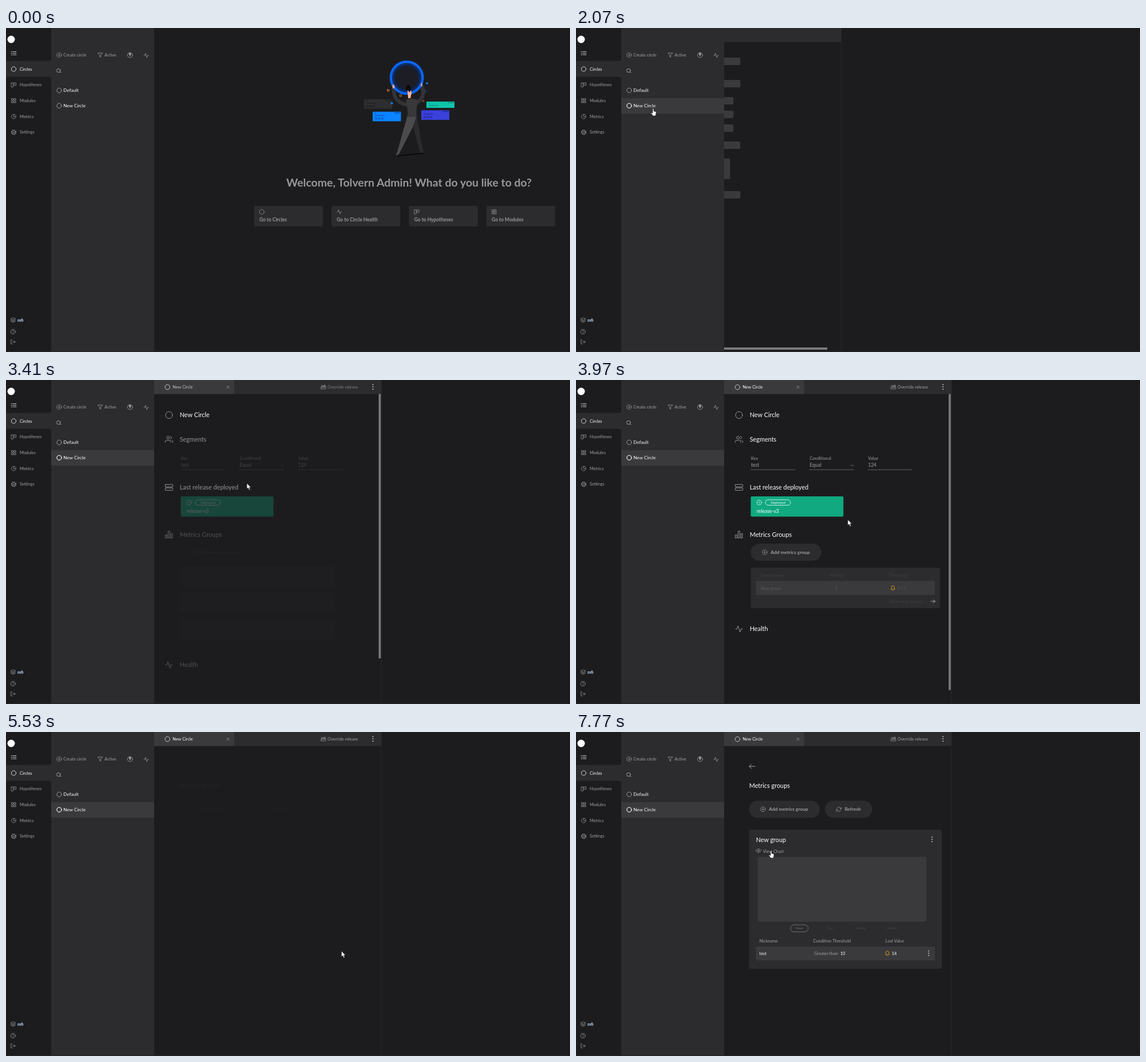
Animation, 986 px wide and 568 px high, one loop 8 s. Source, as an HTML page:

```html
<!DOCTYPE html>
<html lang="en">
<head>
<meta charset="utf-8">
<title>Circles workspace</title>
<style>
html, body { margin: 0; width: 100%; height: 100%; overflow: hidden; background: #1c1c1e; }
svg { display: block; width: 100%; height: 100%; font-family: Lato, sans-serif; }
text { white-space: pre; }
</style>
</head>
<body>
<svg id="stage" viewBox="0 0 986 568" xmlns="http://www.w3.org/2000/svg"></svg>
<script>
const LOOP = 8000;
const GREY = '#a0a0a3', DIM = '#98989b', WHITE = '#fff', PANEL = '#2c2c2e', RAISED = '#3a3a3c';

// Icons live in a 24 unit box
const ICONS = {
  circle: '<circle cx="12" cy="12" r="10"/>',
  list: '<path d="M9 5h14M9 12h14M9 19h14M1 5h4M1 12h4M1 19h4"/>',
  board: '<path d="M2 3h8v18H2zM14 3h8v11h-8z"/>',
  grid: '<path d="M3 3h7v7H3zM14 3h7v7h-7zM14 14h7v7h-7zM3 14h7v7H3z"/>',
  pie: '<path d="M21.2 15.9A10 10 0 1 1 8 2.8M22 12A10 10 0 0 0 12 2v10z"/>',
  gear: '<circle cx="12" cy="12" r="3.2"/><circle cx="12" cy="12" r="8.5"/><circle cx="12" cy="12" r="10.3" stroke-dasharray="4 4.1"/>',
  layers: '<path d="M12 2L2 7l10 5 10-5zM2 17l10 5 10-5M2 12l10 5 10-5"/>',
  help: '<circle cx="12" cy="12" r="10"/><path d="M9 9a3 3 0 0 1 6 1c0 2-3 2-3 4M12 17v.5"/>',
  exit: '<path d="M9 21H3V3h6M16 17l5-5-5-5M21 12H9"/>',
  plus: '<circle cx="12" cy="12" r="10"/><path d="M12 8v8M8 12h8"/>',
  filter: '<path d="M22 3H2l8 9.5V19l4 2v-8.5z"/>',
  pin: '<circle cx="12" cy="12" r="10"/><path d="M9 4h6v6l-3 4-3-4zM12 10v6" fill="#a0a0a3"/>',
  pulse: '<path d="M22 12h-4l-3 9L9 3l-3 9H2"/>',
  search: '<circle cx="11" cy="11" r="8"/><path d="M21 21l-4.3-4.3"/>',
  users: '<circle cx="9" cy="7" r="4"/><path d="M1 21v-2a4 4 0 0 1 4-4h8a4 4 0 0 1 4 4v2M23 21v-2a4 4 0 0 0-3-3.9M16 3.1a4 4 0 0 1 0 7.8"/>',
  server: '<rect x="1" y="4" width="22" height="7" rx="1.5"/><rect x="1" y="14" width="22" height="7" rx="1.5"/>',
  bars: '<path d="M2 13h4v9H2zM10 2h4v20h-4zM18 9h4v13h-4z"/>',
  info: '<circle cx="12" cy="12" r="10"/><path d="M12 16v-5M12 8v-.5"/>',
  bell: '<path d="M18 8A6 6 0 0 0 6 8c0 7-3 9-3 9h18s-3-2-3-9M13.7 21a2 2 0 0 1-3.4 0"/>',
  right: '<path d="M2 12h20M14 5l8 7-8 7"/>',
  left: '<path d="M22 12H2M10 5l-8 7 8 7"/>',
  down: '<path d="M5 8l7 7 7-7"/>',
  close: '<path d="M5 5l14 14M19 5L5 19"/>',
  swap: '<path d="M3 9V5h17M17 2l4 3-4 3M1 13v7h21v-7zM7 13v-3h13"/>',
  refresh: '<path d="M23 4v6h-6M1 20v-6h6M3.5 9a9 9 0 0 1 14.9-3.4L23 10M1 14l4.6 4.4A9 9 0 0 0 20.5 15"/>',
  eye: '<path d="M1 12s4-8 11-8 11 8 11 8-4 8-11 8-11-8-11-8z"/><circle cx="12" cy="12" r="3"/>',
  eyeOff: '<path d="M1 12s4-8 11-8 11 8 11 8-4 8-11 8-11-8-11-8zM21 1L3 23M9 12a3 3 0 0 1 5-2"/>'
};

const icon = (name, x, y, size = 9.7, color = GREY, weight = 1.9) =>
  `<g transform="translate(${x - size / 2} ${y - size / 2}) scale(${size / 24})" fill="none" stroke="${color}" stroke-width="${weight}" stroke-linecap="round" stroke-linejoin="round">${ICONS[name]}</g>`;
const text = (x, y, s, size = 7.4, color = GREY, attrs = '') =>
  `<text x="${x}" y="${y + size * .35}" font-size="${size}" fill="${color}" ${attrs}>${s}</text>`;
const bold = ' font-weight="700"', mid = ' text-anchor="middle"';
const rect = (x, y, w, h, fill, r = 0, attrs = '') =>
  `<rect x="${x}" y="${y}" width="${w}" height="${h}" rx="${r}" fill="${fill}" ${attrs}/>`;
const dots = (x, y, color = '#c8c8ca') =>
  [-4, 0, 4].map(d => `<circle cx="${x}" cy="${y + d}" r="1.05" fill="${color}"/>`).join('');
const shape = (d, fill, attrs = '') => `<path d="${d}" fill="${fill}" ${attrs}/>`;
const fade = (start, length, s) => `<g data-fade="${start},${length}">${s}</g>`;
const during = (from, to, s) => `<g data-span="${from},${to}">${s}</g>`;
const shift = (x, y, s) => `<g transform="translate(${x} ${y})">${s}</g>`;

function miniCard(x, y, w, h, fill, ink) {
  let s = rect(x, y, w, h, fill, .8) + rect(x + 4, y + 6, 17, 1.4, ink) + rect(x + w - 12, y + 1, 11, 1.8, ink) +
    `<circle cx="${x + 5}" cy="${y + 3}" r="1.1" fill="${ink}"/>`;
  if (h > 12) for (let i = 0; i < 3; i++)
    s += `<circle cx="${x + 6 + i * 5.6}" cy="${y + 12}" r="1.8" fill="${ink}" fill-opacity=".5" stroke="${ink}" stroke-width=".7"/>`;
  return s;
}

const ring = (r, color, w) => `<circle cx="700.6" cy="87" r="${r}" fill="none" stroke="${color}" stroke-width="${w}"/>`;
const artwork =
  miniCard(626, 125, 49, 16.5, '#2e2e30', '#1f1f21') + miniCard(641, 146.7, 49.5, 16.8, '#0a84ff', '#0a58bd') +
  miniCard(735, 129, 49, 11, '#0fc4aa', '#0a9482') + miniCard(726, 144.3, 49, 16.7, '#3a40dc', '#262c9c') +
  shape('M680 224.5L731 219.5', 'none', 'stroke="#050506" stroke-width="1.4"') +
  shape('M707 154L718 154L729 216L732 218L724 219Z', '#2b2b2d') +
  shape('M702 153L718 153L711 174L687 221L681 225L684 217Z', '#4b4b4d') +
  shape('M678 104C676 122 684 131 702 135M727 102C733 118 727 127 714 133', 'none', 'stroke="#333335" stroke-width="6.5" stroke-linecap="round"') +
  shape('M699 126Q709 121 721 127Q716 143 718 156L702 156Q703 142 699 126Z', '#39393b') +
  '<circle cx="700.6" cy="87" r="24" fill="#1d1e25"/>' +
  ring(21, '#12213c', 3) + ring(24.2, '#102d63', 4) + ring(27.8, '#0a66ff', 4.2) +
  shape('M675.5 100L678.5 99L679.5 105L676 106ZM725.5 97L727.5 96L727.5 102L725.5 103Z', '#f0a890') +
  shape('M702 110L708 109L709 114L707 123L703 123Z', '#ffb49c') +
  shape('M699 108Q698 104 703 99Q709 102 708 109L705 113L703 109Z', '#09090b') +
  shape('M666.5 107.5L670.5 109L667.5 111.5Z', 'none', 'stroke="#f2893d"') +
  rect(688.5, 117, 3, 3, 'none', 0, 'stroke="#c5822f" stroke-width=".8"') +
  rect(734.5, 95.5, 3.2, 3.2, '#0a84ff', .7) +
  '<circle cx="674.7" cy="132" r="1.9" fill="#0a84ff"/>' +
  '<circle cx="733.3" cy="110.7" r="1.7" fill="none" stroke="#17549e" stroke-width=".8"/>' +
  '<circle cx="729.5" cy="128" r="1.3" fill="none" stroke="#c5822f" stroke-width=".8"/>';

const shortcuts = [['circle', 'Circles'], ['pulse', 'Circle Health'], ['board', 'Hypotheses'], ['grid', 'Modules']]
  .map(([name, label], i) => {
    const x = 433.7 + i * 135.4;
    return rect(x, 311.7, 120.3, 36.3, PANEL, 2.4) + icon(name, x + 13.5, 322.3, 9.7, DIM) +
      text(x + 9.2, 336.5, 'Go to ' + label, 8.45, DIM, bold);
  }).join('');

const welcome = during(0, 1980, artwork +
  text(704.5, 271, 'Welcome, Tolvern Admin! What do you like to do?', 19.45, DIM, bold + mid) + shortcuts);

const skeleton = during(1980, 2850,
  [[284, 52, 196], [284, 91, 196], [304, 121, 164], [304, 145, 164], [304, 169, 164],
   [284, 199, 196], [305, 229, 157, 36], [284, 286, 196]]
    .map(([x, y, w, h = 13]) => rect(x, y, w, h, RAISED, 2.5)).join('') + rect(259, 560, 373, 4, '#7b7b7d'));

const header = rect(259, 0, 397, 24.5, PANEL) + during(2850, LOOP,
  rect(259, 0, 140, 24.5, RAISED) + icon('circle', 282.3, 12.5, 10.2, '#e4e4e6') + icon('close', 388, 12.5, 7, '#c8c8ca') +
  fade(3000, 600, text(291.2, 12.5, 'New Circle', 7.4, WHITE)) +
  icon('swap', 555, 12.5, 9.5) + fade(3000, 600, text(562, 12.5, 'Override release')) + dots(641.5, 12));

const heading = (name, y, label, start, iconStart = 2700) =>
  fade(iconStart, 500, icon(name, 285, y, 14.5, GREY, 1.5)) + fade(start, 500, text(303.7, y, label, 10.9, WHITE));
const field = (x, label, value) =>
  text(x + .5, 137, label) + text(x + .5, 149, value, 8.5) + rect(x, 156.8, 78, .8, '#707072');
const pillButton = (x, y, w, name, label) =>
  rect(x, y, w, 30, PANEL, 15) + icon(name, x + 24.5, y + 15, 9.7) + text(x + 34.7, y + 15, label, 8.4, GREY, bold);
const health = y => heading('pulse', y, 'Health', 3300, 3150);
const thumb = (from, to, h) => during(from, to, rect(651.5, 24.5, 3.8, h, '#7b7b7d'));

const details = during(2850, 5370,
  heading('circle', 61.5, 'New Circle', 2890) + heading('users', 104, 'Segments', 3150) +
  fade(3270, 500, field(305.5, 'Key', 'test') + field(408, 'Conditional', 'Equal') + field(510, 'Value', '124') +
    icon('down', 483, 150, 8)) +
  heading('server', 188, 'Last release deployed', 3150) +
  fade(3260, 500, rect(305.5, 204, 162, 35.5, '#10a980', 2) + icon('info', 320.3, 214.8, 9.7, WHITE) +
    rect(331, 210, 44, 9.5, 'none', 4.75, 'stroke="#fff" stroke-width=".8"') +
    text(353, 214.8, 'Deployed', 6.1, WHITE, mid) + text(316, 230, 'release-v3', 8.5, WHITE)) +
  heading('bars', 271, 'Metrics Groups', 3300, 3100) +
  fade(3385, 500, pillButton(305.5, 287, 123.5, 'plus', 'Add metrics group')) +
  during(2850, 3800, fade(3350, 500, [326, 372.5, 418.5].map(y => rect(305.5, y, 270, 36, PANEL, 2)).join('')) + health(499.5)) +
  during(3800, LOOP, rect(305.5, 329, 331, 71, PANEL, 2.4) + rect(314.5, 352.3, 313, 24.4, RAISED, 2.4) +
    icon('bell', 554, 364.8, 9.7, '#f5a50a') + icon('right', 624, 388, 9, '#d8d8da') +
    fade(3900, 450, text(323, 342.8, 'Group name') + text(443.5, 342.8, 'Metrics') + text(547, 342.8, 'Threshold') +
      text(323, 365, 'New group', 7.4, WHITE) + text(453, 365, '1', 7.4, WHITE) + text(562, 365, '1 / 1', 7.4, WHITE) +
      text(547.5, 388, 'View more groups')) + health(436.5)) +
  thumb(2850, 3800, 463.5) + thumb(3800, 4310, 519) + thumb(4310, 5370, 540));

const valueRow = text(320.5, 231.5, 'Nickname') + text(414.5, 231.5, 'Condition Threshold') + text(541, 231.5, 'Last Value') +
  rect(314.5, 240.7, 313, 24.4, RAISED, 2.4) + text(320.5, 253, 'test', 7.4, WHITE) +
  text(416.5, 253, 'Greater than:') + text(462, 253, '10', 7.4, WHITE) +
  icon('bell', 544.3, 252.7, 9.7, '#f5a50a') + text(552, 253, '14', 7.4, WHITE) + dots(616.5, 252.3);

const chart = rect(317.5, 218.8, 295, 113.7, RAISED, 4) +
  fade(7390, 250, rect(375, 338, 31, 12.4, 'none', 6.2, 'stroke="#78787a" stroke-width=".9"')) +
  fade(7390, 400, text(390.3, 344.2, 'Hour', 6.1, '#707072', mid) +
    ['Day', 'Week', 'Month'].map((s, i) => text(444.3 + i * 54, 344.2, s, 6.1, '#47474a', mid)).join(''));

const groups = during(5370, LOOP,
  fade(5620, 480, icon('left', 308, 60.3, 12.5, '#b4b4b6', 1.7)) +
  fade(5520, 500, text(302.7, 94.3, 'Metrics groups', 10.9, WHITE) +
    pillButton(302.5, 120.5, 123.5, 'plus', 'Add metrics group') + pillButton(435, 120.5, 83, 'refresh', 'Refresh')) +
  fade(5650, 550, during(5370, 7390, rect(302.5, 171.3, 337, 108.4, PANEL, 2.4)) + during(7390, LOOP, rect(302.5, 171.3, 337, 243.7, PANEL, 2.4)) +
    text(314.7, 189.7, 'New group', 10.8, WHITE) + dots(622.5, 188.2) + text(326.7, 209.2, 'View Chart') +
    during(5370, 7390, icon('eyeOff', 319, 209) + valueRow) +
    during(7390, LOOP, icon('eye', 319, 208) + chart + shift(0, 135.4, valueRow))));

const panel = `<g id="panel">${rect(259, 0, 397, 568, '#1c1c1e')}${header}${skeleton}${details}${groups}${rect(655.8, 0, .8, 568, '#2c2c2e')}</g>`;

const nav = [['Circles', 'circle'], ['Hypotheses', 'board'], ['Modules', 'grid'], ['Metrics', 'pie'], ['Settings', 'gear']]
  .map(([label, name], i) => {
    const y = 72 + i * 27.7, color = i ? GREY : WHITE;
    return icon(name, 13.5, y, 9.7, color) + text(24, y, label, 7.35, color);
  }).join('');

const sidebar = rect(0, 0, 79, 568, '#1c1c1e') + rect(79, 0, 180, 568, PANEL) +
  shape('M0 57.8H75Q79 57.8 79 53.8V89.5Q79 85.5 75 85.5H0Z', PANEL) +
  '<circle cx="9" cy="20" r="6.5" fill="#fff"/>' + icon('list', 13.5, 44.2, 9.5, '#d0d0d2', 2.4) + nav +
  icon('layers', 12.3, 512) + text(20, 512.3, 'mfi', 7.4, '#cbe2ff', bold) + icon('help', 12.3, 532.3) + icon('exit', 12.3, 550.3) +
  icon('plus', 93, 47.3) + text(100.3, 47.5, 'Create circle') + icon('filter', 164.8, 47.5) + text(172.3, 47.5, 'Active') +
  icon('pin', 216.8, 47.5, 10.5) + icon('pulse', 245, 48) + icon('search', 92.3, 75, 9.7, '#c0c0c2') +
  during(1980, LOOP, rect(79, 123, 180, 27, RAISED)) +
  icon('circle', 93, 109.4, 9.9, '#b4b4b6') + text(100.3, 109.5, 'Default', 8.15, WHITE) +
  icon('circle', 93, 136.3, 9.9, '#b4b4b6') + during(1980, LOOP, icon('circle', 93, 136.3, 9.9, WHITE, 2.2)) +
  text(100.3, 136.5, 'New Circle', 8.15, WHITE);

const HAND = 'M3 1Q3 0 4 0T5 1V4.8L8.2 5.6Q9.3 6 9.2 7.2L8.6 10.8L7.8 13H3.6L.2 8.4Q-.2 7.4 1 7.2L3 8.6Z';
const ARROW = 'M0 0V10L2.3 8L4.1 12L5.8 11.3L4.1 7.4H7.2Z';
const outline = 'stroke="#111" stroke-width=".6"';
const cursor = `<g id="cursor">${shape(ARROW, WHITE, 'id="arrow" ' + outline)}${shape(HAND, WHITE, 'id="hand" ' + outline)}</g>`;

const stage = document.getElementById('stage');
stage.innerHTML = welcome + panel + sidebar + rect(0, 566.6, 986, 1.4, '#252527') + cursor;

const $ = id => document.getElementById(id);
const clamp = v => Math.max(0, Math.min(1, v));
const show = (el, on) => el.setAttribute('display', on ? 'inline' : 'none');
const read = key => [...stage.querySelectorAll(`[data-${key}]`)].map(el => [el, ...el.dataset[key].split(',').map(Number)]);
const fades = read('fade'), spans = read('span');

// Pointer stops: time, x, y
const PATH = [[70, 933, 558], [800, 350, 226], [1190, 131, 142], [2070, 131, 141], [2560, 131, 141], [3410, 421, 181],
  [3970, 475, 244.5], [4220, 500, 289], [4960, 586.4, 384], [6030, 586.4, 384], [6190, 552, 335], [6580, 457, 270.5], [6990, 337, 208]];
const HOVERS = [[1440, 2600], [4900, 5400], [7060, LOOP]];

function pointer(t) {
  const i = PATH.findIndex(p => p[0] > t);
  if (i < 0) return PATH[PATH.length - 1].slice(1);
  if (!i) return PATH[0].slice(1);
  const a = PATH[i - 1], b = PATH[i], k = (t - a[0]) / (b[0] - a[0]);
  return [a[1] + (b[1] - a[1]) * k, a[2] + (b[2] - a[2]) * k];
}

function render(t) {
  for (const [el, from, to] of spans) show(el, t >= from && t < to);
  for (const [el, start, length] of fades) el.setAttribute('opacity', clamp((t - start) / length));
  const left = 1 - clamp((t - 1980) / 300);
  show($('panel'), t >= 1980);
  $('panel').setAttribute('transform', `translate(${-397 * left * left} 0)`);
  const hover = HOVERS.some(([a, b]) => t >= a && t < b);
  show($('cursor'), t >= 70);
  show($('hand'), hover);
  show($('arrow'), !hover);
  $('cursor').setAttribute('transform', `translate(${pointer(t)})`);
}

function tick() {
  render(performance.now() % LOOP);
  requestAnimationFrame(tick);
}
tick();
</script>
</body>
</html>
```
